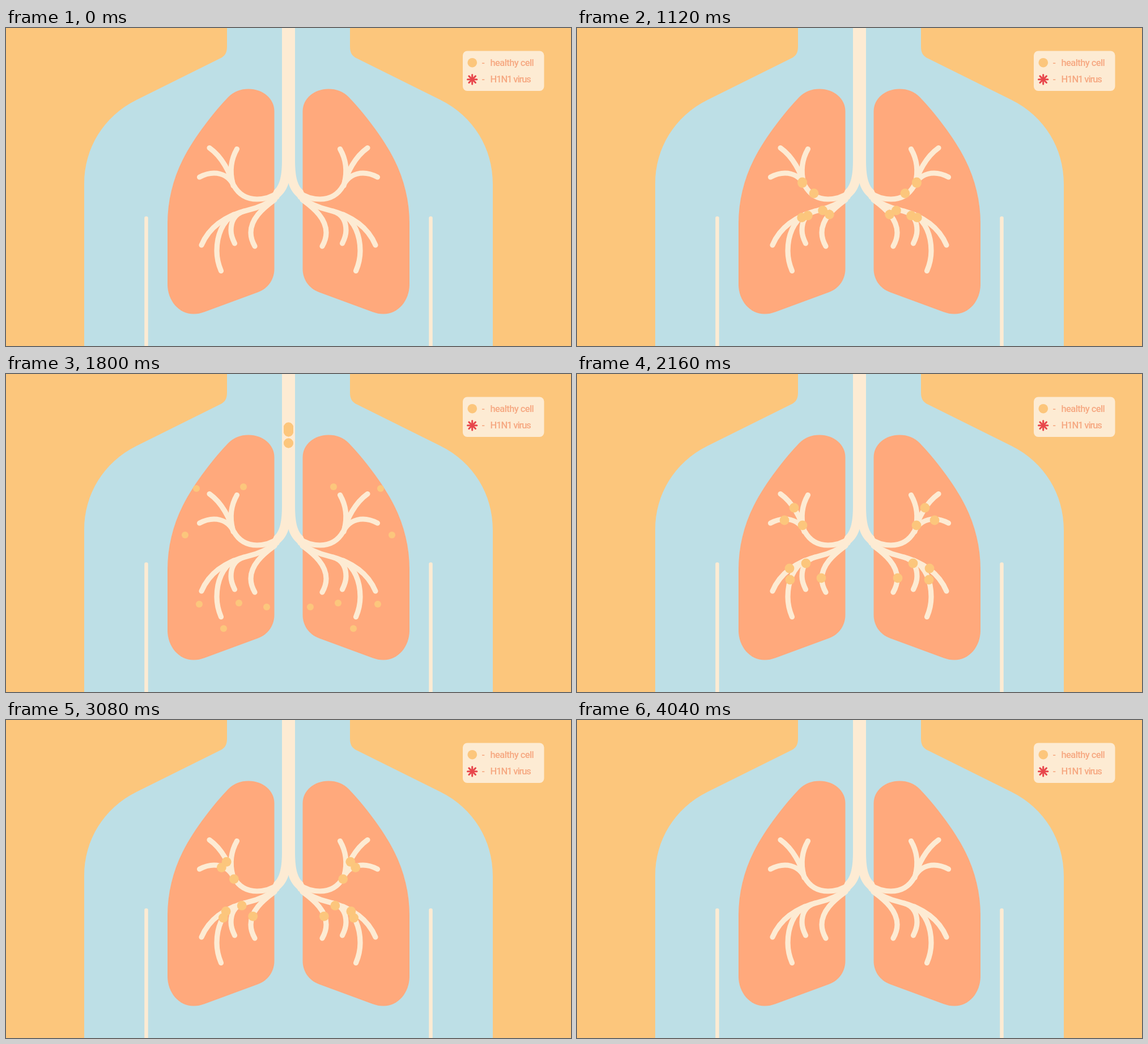
These frames come from a looping animation (997 by 561 pixels, 4120 ms). An HTML page with a canvas:

```html
<!DOCTYPE html>
<html lang="en">
<head>
<meta charset="utf-8">
<title>Breathing</title>
<style>
  html, body { margin: 0; width: 100%; height: 100%; overflow: hidden; background: #fcc67c; }
  canvas, svg { position: absolute; left: 0; top: 0; width: 100%; height: 100%; display: block; }
  text { font: 500 16.5px Roboto, "Open Sans", sans-serif; fill: #f6a881; }
</style>
</head>
<body>
<canvas id="stage" width="997" height="561"></canvas>
<svg viewBox="0 0 997 561" preserveAspectRatio="none">
  <text x="839.5" y="67">-</text>
  <text x="854.5" y="67" letter-spacing="-0.6">healthy cell</text>
  <text x="839.5" y="96">-</text>
  <text x="854.5" y="96" letter-spacing="-1.1">H1N1 virus</text>
</svg>
<script>
const W = 997, H = 561, LOOP = 4120, STEP = 40;
const WAVES = [0, 960, 1920];
const ENTER = 480, SHRINK = 1440, GONE = 2120, RADIUS = 8.4;
const ORANGE = '#fcc67c', BLUE = '#bddfe6', LUNG = '#ffa97c', CREAM = '#fdebd3', RED = '#e8474c';
const ctx = document.getElementById('stage').getContext('2d');

// Everything below is the left half; the right half is its mirror.
const body = new Path2D('M499 0H390V33C390 44 386 50 377 54L230 127C172 156 138 212 138 275V561H499Z');
const lung = new Path2D('M473.5 147C473.5 124 453 107.5 428 107.5C414 107.5 402 112 392 122' +
  'C368 147 332 192 312 232C294 268 285 306 285 345V452C285 481 305 504.5 331 504.5' +
  'C338 504.5 343 503.5 350 501L445 466C463 459 473.5 443 473.5 425Z');
const trachea = new Path2D('M499 0H487V232C487 258 484 277 473 286L466 303L475 304C487 297 495 286 498.5 274H499Z');
const bronchi = [
  'M480 290C468 299 455 302 443 302C424 302 411 294 402 278C394 262 380 256 367 256C357 256 349 259 341.5 263',
  'M401 278C396 256 381 227 359 211.5',
  'M400 274C394 250 398 230 407.5 213.5',
  'M478 298C460 311 445 317 428 321C395 329 361 345 345 383',
  'M402 329C382 341 372 366 372 393C372 406 375 418 379.5 428.5',
  'M420 323C402 329 397 342 397 357C397 366 400 373 403.5 380',
  'M474 303C452 319 432 337 432 361C432 370 435 378 439 385'
].map(d => new Path2D(d));

// Cell routes: trunk, junctions, then four timed stops.
const trunk = [[498.5, -10], [498.5, 110], [498.5, 220], [492, 262], [478, 291]];
const upper = [...trunk, [442, 302], [404, 282]];
const lower = [...trunk, [445, 317]];
const STOPS = [1200, 1360, 1440, 1760];
const cells = [
  route(111, upper, [[383, 236], [364, 216], [355, 210], [336, 202]]),
  route(107, upper, [[398, 267], [400, 232], [406, 219], [419, 199]]),
  route(112, [...upper, [392, 265]], [[366, 258], [344, 263], [334, 269], [316, 284]]),
  route(110, lower, [[375, 343], [356, 363], [349, 375], [341, 406]]),
  route(132, [...lower, [400, 332]], [[376, 363], [372, 401], [375, 418], [384, 449]]),
  route(105, lower, [[404, 334], [397, 364], [401, 379], [411, 404]]),
  route(104, [...trunk, [450, 322]], [[431, 360], [438, 390], [445, 399], [460, 411]])
];

function spline(a, b, c, d, u) {
  return 0.5 * (2 * b + (c - a) * u + (2 * a - 5 * b + 4 * c - d) * u * u +
    (3 * b - a - 3 * c + d) * u * u * u);
}

// early: distance covered in the windpipe by 840 ms
function route(early, start, stops) {
  const pts = [...start, ...stops], line = [[...pts[0], 0]], marks = [0];
  const at = i => pts[Math.max(0, Math.min(pts.length - 1, i))];
  let len = 0;
  for (let i = 0; i < pts.length - 1; i++) {
    for (let k = 1; k <= 20; k++) {
      const [x, y] = [0, 1].map(j => spline(at(i - 1)[j], at(i)[j], at(i + 1)[j], at(i + 2)[j], k / 20));
      const last = line[line.length - 1];
      len += Math.hypot(x - last[0], y - last[1]);
      line.push([x, y, len]);
    }
    marks.push(len);
  }
  const [s0, s1, s2, s3] = marks.slice(-4);
  const keys = [[ENTER, 0], [640, early * 0.11], [760, early * 0.505], [800, early * 0.74], [840, early],
    [1000, len * 0.61], [STOPS[0], s0], [STOPS[1], s1], [STOPS[2], s2], [1560, (s2 + s3) / 2], [STOPS[3], s3]];
  return { line, travel: monotone(keys) };
}

// Smooth interpolation that never runs backwards
function monotone(keys) {
  const n = keys.length;
  const rate = i => (keys[i + 1][1] - keys[i][1]) / (keys[i + 1][0] - keys[i][0]);
  const slope = keys.map((_, i) => {
    if (i === 0 || i === n - 1) return 0;
    const a = rate(i - 1), b = rate(i);
    return a * b > 0 ? 2 * a * b / (a + b) : 0;
  });
  return t => {
    if (t >= keys[n - 1][0]) return keys[n - 1][1];
    let i = 0;
    while (t >= keys[i + 1][0]) i++;
    const h = keys[i + 1][0] - keys[i][0], u = (t - keys[i][0]) / h, v = 1 - u;
    return keys[i][1] * (1 + 2 * u) * v * v + slope[i] * h * u * v * v +
      keys[i + 1][1] * u * u * (3 - 2 * u) - slope[i + 1] * h * u * u * v;
  };
}

function pointAt(line, s) {
  let i = 1;
  while (i < line.length - 1 && line[i][2] < s) i++;
  const a = line[i - 1], b = line[i], u = (s - a[2]) / (b[2] - a[2]);
  return [a[0] + (b[0] - a[0]) * u, a[1] + (b[1] - a[1]) * u];
}

function mirrored(draw) {
  draw();
  ctx.save();
  ctx.translate(W, 0);
  ctx.scale(-1, 1);
  draw();
  ctx.restore();
}

function dot(x, y, r, color) {
  ctx.fillStyle = color;
  ctx.beginPath();
  ctx.arc(x, y, r, 0, Math.PI * 2);
  ctx.fill();
}

function fill(path, color) {
  ctx.fillStyle = color;
  ctx.fill(path);
}

function segment(x1, y1, x2, y2) {
  ctx.beginPath();
  ctx.moveTo(x1, y1);
  ctx.lineTo(x2, y2);
  ctx.stroke();
}

function torso() {
  fill(body, BLUE);
  fill(lung, LUNG);
  ctx.strokeStyle = CREAM;
  ctx.lineWidth = 6.5;
  segment(247.5, 335.5, 247.5, H + 9);
  ctx.lineWidth = 9.2;
  bronchi.forEach(b => ctx.stroke(b));
  fill(trachea, CREAM);
}

function legend() {
  ctx.fillStyle = CREAM;
  ctx.beginPath();
  ctx.roundRect(806, 40.5, 143.5, 70.5, 8);
  ctx.fill();
  dot(822.8, 61.2, 8.3, ORANGE);
  ctx.strokeStyle = RED;
  ctx.lineWidth = 3;
  for (let i = 0; i < 4; i++) {
    const x = 8.2 * Math.cos(i * Math.PI / 4), y = 8.2 * Math.sin(i * Math.PI / 4);
    segment(822.7 - x, 90.7 - y, 822.7 + x, 90.7 + y);
  }
}

function wave(t) {
  if (t < ENTER || t >= GONE) return;
  const u = Math.max(0, (t - SHRINK) / (GONE - SHRINK));
  const r = RADIUS * (1 - u * u);
  for (const c of cells) {
    const [x, y] = pointAt(c.line, c.travel(t));
    dot(x, y, r, ORANGE);
    dot(W - x, y, r, ORANGE);
  }
}

function frame(now) {
  const t = Math.floor(now % LOOP / STEP) * STEP;
  ctx.lineCap = 'round';
  ctx.fillStyle = ORANGE;
  ctx.fillRect(0, 0, W, H);
  mirrored(torso);
  legend();
  WAVES.forEach(w => wave(t - w));
  requestAnimationFrame(frame);
}
requestAnimationFrame(frame);
</script>
</body>
</html>
```
